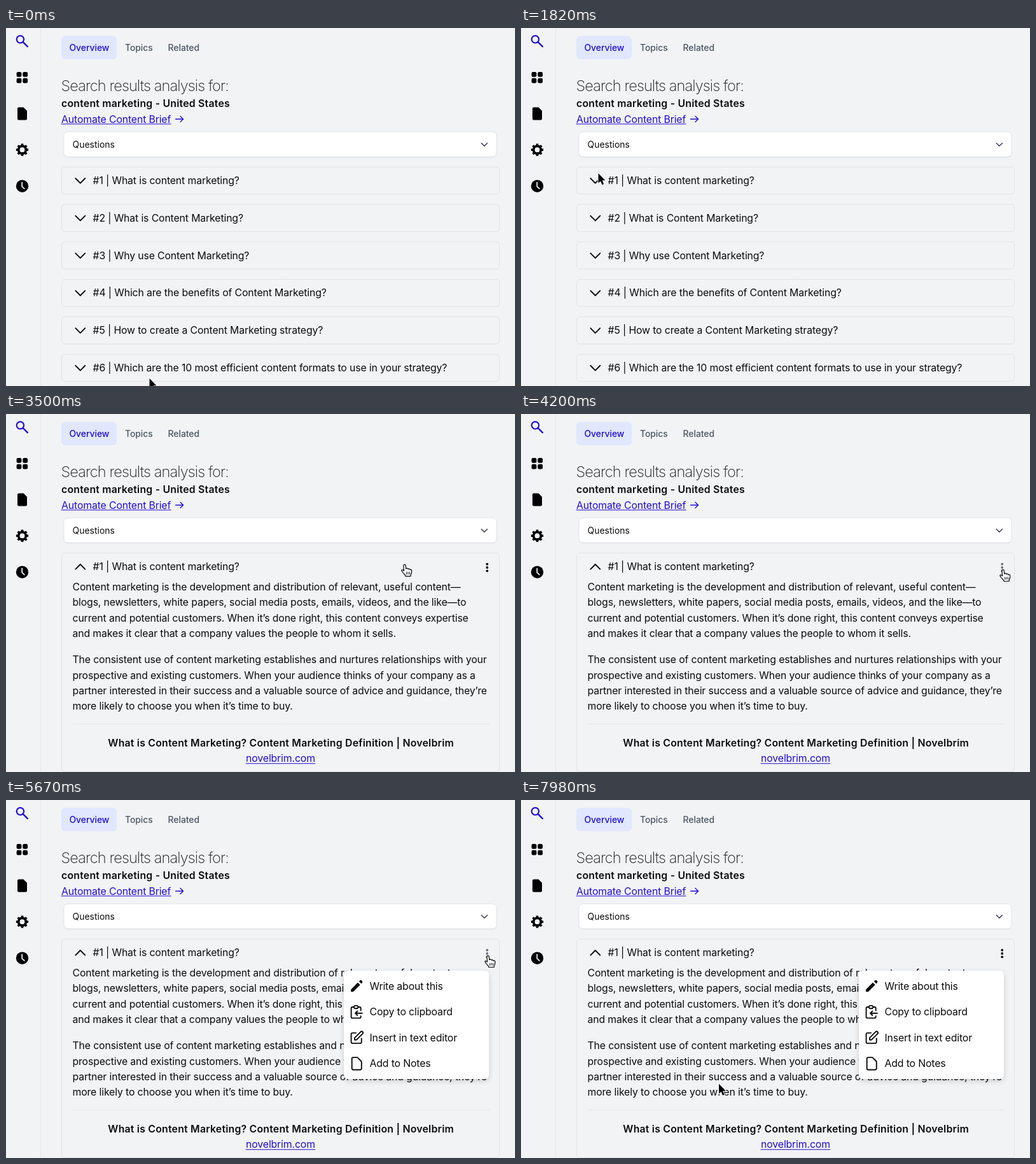
Animation, 800 px wide and 562 px high, one loop 8000 ms. Source, as an HTML page with a canvas:

```html
<!DOCTYPE html>
<html lang="en">
<head>
<meta charset="utf-8">
<title>Search results analysis</title>
<style>
html, body { margin: 0; width: 100%; height: 100%; overflow: hidden; background: #f2f3f5; }
canvas { display: block; width: 800px; height: 562px; }
</style>
</head>
<body>
<canvas id="stage"></canvas>
<script>
const W = 800, H = 562, LOOP = 8000;
const BG = '#f2f3f5', LINE = '#e2e3e7', INK = '#0b0b0d', BLUE = '#200ddb', GRAY = '#6b7280';
const OPEN_AT = 2870, RING_AT = 4900, MENU_AT = 5040;

const canvas = document.getElementById('stage');
const ctx = canvas.getContext('2d');
const dpr = window.devicePixelRatio || 1;
canvas.width = W * dpr;
canvas.height = H * dpr;

// weight, size, letter spacing
const FONT = {
  body: [400, 15.8, -0.125],
  bold: [600, 15.8, 0.23],
  small: [400, 13.9, 0.05],
  tab: [500, 13.9, -0.03],
  title: [200, 23.6, -0.9]
};

const QUESTIONS = [
  'What is content marketing?',
  'What is Content Marketing?',
  'Why use Content Marketing?',
  'Which are the benefits of Content Marketing?',
  'How to create a Content Marketing strategy?',
  'Which are the 10 most efficient content formats to use in your strategy?'
];

const ANSWER = [
  ['Content marketing is the development and distribution of relevant, useful content—',
   'blogs, newsletters, white papers, social media posts, emails, videos, and the like—to',
   'current and potential customers. When it’s done right, this content conveys expertise',
   'and makes it clear that a company values the people to whom it sells.'],
  ['The consistent use of content marketing establishes and nurtures relationships with your',
   'prospective and existing customers. When your audience thinks of your company as a',
   'partner interested in their success and a valuable source of advice and guidance, they’re',
   'more likely to choose you when it’s time to buy.']
];

const ICON = {
  pencil: new Path2D('M16.3 4.3a2.4 2.4 0 1 1 3.4 3.4l-.95.95-3.4-3.4zM13.65 6.95L3.6 17V20.4H7L17.05 10.35z'),
  clipboard: new Path2D('M8 5H6a2 2 0 0 0-2 2v12a2 2 0 0 0 2 2h10a2 2 0 0 0 2-2v-1M8 5a2 2 0 0 0 2 2h2a2 2 0 0 0 2-2M8 5a2 2 0 0 1 2-2h2a2 2 0 0 1 2 2m0 0h2a2 2 0 0 1 2 2v3m2 4H10m0 0l3-3m-3 3l3 3'),
  edit: new Path2D('M11 5H6a2 2 0 0 0-2 2v11a2 2 0 0 0 2 2h11a2 2 0 0 0 2-2v-5m-1.4-9.4a2 2 0 1 1 2.8 2.8L11.8 15H9v-2.8z'),
  note: new Path2D('M7 21h10a2 2 0 0 0 2-2V9.4a1 1 0 0 0-.3-.7l-5.4-5.4a1 1 0 0 0-.7-.3H7a2 2 0 0 0-2 2v14a2 2 0 0 0 2 2z')
};
const MENU = [
  ['pencil', 'Write about this'],
  ['clipboard', 'Copy to clipboard'],
  ['edit', 'Insert in text editor'],
  ['note', 'Add to Notes']
];

const ARROW = new Path2D('M0 0V15.6L3.5 12.4 6.1 18.3 8.7 17.1 6.2 11.3H10.9z');
const HAND = new Path2D('M-1.6 1Q-1.6-.6 0-.6 1.5-.6 1.7 1L2.2 6Q3 4.8 4.4 5.2 5.3 5.5 5.4 6.4 6.5 5.6 7.6 6.2 8.4 6.7 8.4 7.4 9.6 6.7 10.6 7.5 11.4 8.2 11.2 10 11.2 12.5 9.8 15L9.6 17.5H1.2L1 16Q-1.5 13.5-3.6 10.5-5.2 8.6-4.2 7.8-3 7.1-1 9.2z');

const ease = {
  in: p => p * p,
  out: p => 1 - (1 - p) ** 2,
  both: p => p * p * (3 - 2 * p)
};

// time, x, y, easing used to arrive
const TRACK = [
  [0, 225.5, 550, 'both'],
  [1550, 121.5, 228, 'both'],
  [1900, 121.5, 228, 'both'],
  [2250, 117, 234.5, 'both'],
  [3000, 117, 234.5, 'both'],
  [3500, 626, 237, 'in'],
  [4100, 757.5, 245, 'out'],
  [5700, 757.5, 245, 'both'],
  [6860, 311, 445.5, 'both'],
  [LOOP, 311, 445.5, 'both']
];

const rowY = i => 239.5 + 58.8 * i;
const within = (p, x0, y0, x1, y1) => p.x > x0 && p.x < x1 && p.y > y0 && p.y < y1;

function pointer(t) {
  const i = TRACK.findIndex(k => k[0] > t);
  const [t0, x0, y0] = TRACK[i - 1], [t1, x1, y1, e] = TRACK[i];
  const p = ease[e]((t - t0) / (t1 - t0));
  return { x: x0 + (x1 - x0) * p, y: y0 + (y1 - y0) * p };
}

function text(str, x, y, style, color = INK, align = 'left') {
  const [weight, size, gap] = FONT[style];
  ctx.font = `${weight} ${size}px Inter, "Open Sans", sans-serif`;
  ctx.letterSpacing = gap + 'px';
  ctx.textAlign = align;
  ctx.fillStyle = color;
  ctx.fillText(str, x, y);
  return ctx.measureText(str).width;
}

function box(x, y, w, h, r, fill, stroke, lw = 1) {
  ctx.beginPath();
  ctx.roundRect(x, y, w, h, r);
  if (fill) { ctx.fillStyle = fill; ctx.fill(); }
  if (stroke) { ctx.strokeStyle = stroke; ctx.lineWidth = lw; ctx.stroke(); }
}

function line(points, color, lw) {
  ctx.beginPath();
  points.forEach(([x, y]) => ctx.lineTo(x, y));
  ctx.strokeStyle = color;
  ctx.lineWidth = lw;
  ctx.stroke();
}

function dot(x, y, r, color) {
  ctx.beginPath();
  ctx.arc(x, y, r, 0, 7);
  ctx.fillStyle = color;
  ctx.fill();
}

function shadow(color, blur, y) {
  ctx.shadowColor = color;
  ctx.shadowBlur = blur * dpr;
  ctx.shadowOffsetY = y * dpr;
}

function chevron(x, y, w, h, color, lw) {
  line([[x - w, y - h], [x, y + h], [x + w, y - h]], color, lw);
}

function sidebar() {
  line([[54.5, 0], [54.5, H]], '#e6e7ea', 1);

  ctx.beginPath();
  ctx.arc(22.4, 17.8, 5.7, 0, 7);
  ctx.strokeStyle = BLUE;
  ctx.lineWidth = 2.2;
  ctx.stroke();
  line([[26.8, 22.2], [33.8, 29.2]], BLUE, 2.5);

  for (const x of [16.6, 26.3]) for (const y of [69, 78.7]) box(x, y, 7.8, 7.8, 2.2, '#000');

  ctx.fillStyle = '#000';
  ctx.fill(new Path2D('M20 124.5H27.5L33 130V142.5A2 2 0 0 1 31 144.5H20A2 2 0 0 1 18 142.5V126.5A2 2 0 0 1 20 124.5z'));

  ctx.save();
  ctx.translate(25.5, 191.2);
  ctx.beginPath();
  ctx.arc(0, 0, 5.8, 0, 7);
  ctx.strokeStyle = '#000';
  ctx.lineWidth = 3.8;
  ctx.stroke();
  for (let i = 0; i < 8; i++) {
    ctx.fillStyle = '#000';
    ctx.fillRect(-1.8, -9.6, 3.6, 4);
    ctx.rotate(Math.PI / 4);
  }
  ctx.restore();

  dot(25.5, 248.2, 9.7, '#000');
  line([[25.2, 242.5], [25.2, 248.8], [28.8, 252.2]], BG, 1.8);
}

function header() {
  box(87, 12.5, 87, 36.5, 6, '#e0e7fe');
  text('Overview', 99.5, 35.8, 'tab', BLUE);
  text('Topics', 187, 35.8, 'tab', '#4b5563');
  text('Related', 254.5, 35.8, 'tab', '#4b5563');

  text('Search results analysis for:', 86.5, 99, 'title', '#18181b');
  text('content marketing - United States', 87, 124.2, 'bold');
  const w = text('Automate Content Brief', 87, 148.5, 'body', BLUE);
  line([[87, 150.8], [87 + w, 150.8]], BLUE, 1.1);
  line([[266.5, 143], [278.5, 143]], BLUE, 1.4);
  line([[274, 138.5], [278.5, 143], [274, 147.5]], BLUE, 1.4);

  shadow('rgba(0,0,0,.08)', 2, 1);
  box(91, 163, 680, 39, 6, '#fff');
  shadow('transparent', 0, 0);
  box(91, 163, 680, 39, 6, null, '#e3e5e9');
  text('Questions', 104.5, 187.6, 'small');
  chevron(751.8, 183, 4.6, 2.3, '#35355c', 1.4);
}

function rowTitle(i, h) {
  const y = rowY(i);
  chevron(116.8, y + 0.3, 7.5, h, INK, 1.9);
  text(`#${i + 1} | ${QUESTIONS[i]}`, 136.5, y + 5.4, 'body');
}

function closedRows() {
  QUESTIONS.forEach((_, i) => {
    box(87.5, rowY(i) - 21.3, 688, 42.6, 5, null, LINE);
    rowTitle(i, 3.8);
  });
}

function openRow(ring, hover) {
  box(87.5, 218.2, 688, 343.3, 5, null, LINE);
  rowTitle(0, -3.8);
  ANSWER.forEach((part, p) => part.forEach((s, i) =>
    text(s, 104.5, 277 + p * 114.1 + i * 24.45, 'body')));
  line([[105, 486.5], [760, 486.5]], '#e6e7ea', 1);

  text('What is Content Marketing? Content Marketing Definition | Novelbrim', 160.3, 522, 'bold');
  const w = text('novelbrim.com', 431.5, 546.4, 'body', BLUE, 'center');
  line([[431.5 - w / 2, 548.8], [431.5 + w / 2, 548.8]], BLUE, 1.1);

  if (ring) box(726.5, 219, 59.3, 43.5, 8, BG, BLUE, 1.5);
  for (const d of [-5.3, 0, 5.3]) dot(756.2, 241 + d, 1.9, hover ? GRAY : INK);
}

function menu(alpha) {
  ctx.save();
  ctx.globalAlpha = alpha;
  shadow('rgba(0,0,0,.16)', 9, 3);
  box(531, 268, 228, 170, 6, '#fff');
  shadow('transparent', 0, 0);
  MENU.forEach(([icon, label], i) => {
    const y = 292 + 40.6 * i;
    text(label, 571.5, y + 5.5, 'body');
    ctx.save();
    ctx.translate(551.2, y);
    ctx.scale(1.08, 1.08);
    ctx.translate(-12, -12);
    ctx.fillStyle = ctx.strokeStyle = INK;
    ctx.lineWidth = 1.75;
    if (icon === 'pencil') ctx.fill(ICON[icon]);
    else ctx.stroke(ICON[icon]);
    ctx.restore();
  });
  ctx.restore();
}

function cursor(p, hand) {
  ctx.save();
  ctx.translate(p.x, p.y);
  if (hand) {
    ctx.fillStyle = '#fff';
    ctx.fill(HAND);
    ctx.strokeStyle = '#000';
    ctx.lineWidth = 1.2;
    ctx.stroke(HAND);
    for (const x of [3, 5.4, 7.8]) line([[x, 11], [x, 14.6]], '#000', 0.9);
  } else {
    ctx.strokeStyle = '#fff';
    ctx.lineWidth = 2;
    ctx.stroke(ARROW);
    ctx.fillStyle = '#000';
    ctx.fill(ARROW);
  }
  ctx.restore();
}

function draw(t) {
  const p = pointer(t);
  const open = t >= OPEN_AT;
  const menuAlpha = Math.min(1, Math.max(0, (t - MENU_AT + 35) / 70));
  const overDots = open && within(p, 727, 220, 786, 263);
  const rows = open ? [0] : QUESTIONS.map((_, i) => i);
  const overRow = rows.some(i => within(p, 105, rowY(i) - 11, 760, rowY(i) + 11));
  const overMenu = menuAlpha > 0 && within(p, 531, 268, 759, 438);

  ctx.setTransform(dpr, 0, 0, dpr, 0, 0);
  ctx.fillStyle = BG;
  ctx.fillRect(0, 0, W, H);
  ctx.lineCap = ctx.lineJoin = 'round';

  sidebar();
  header();
  if (open) openRow(t >= RING_AT && t < MENU_AT, overDots);
  else closedRows();
  if (menuAlpha > 0) menu(menuAlpha);
  cursor(p, overRow || overDots || overMenu);
}

function tick() {
  draw(performance.now() % LOOP);
  requestAnimationFrame(tick);
}
tick();
</script>
</body>
</html>
```
